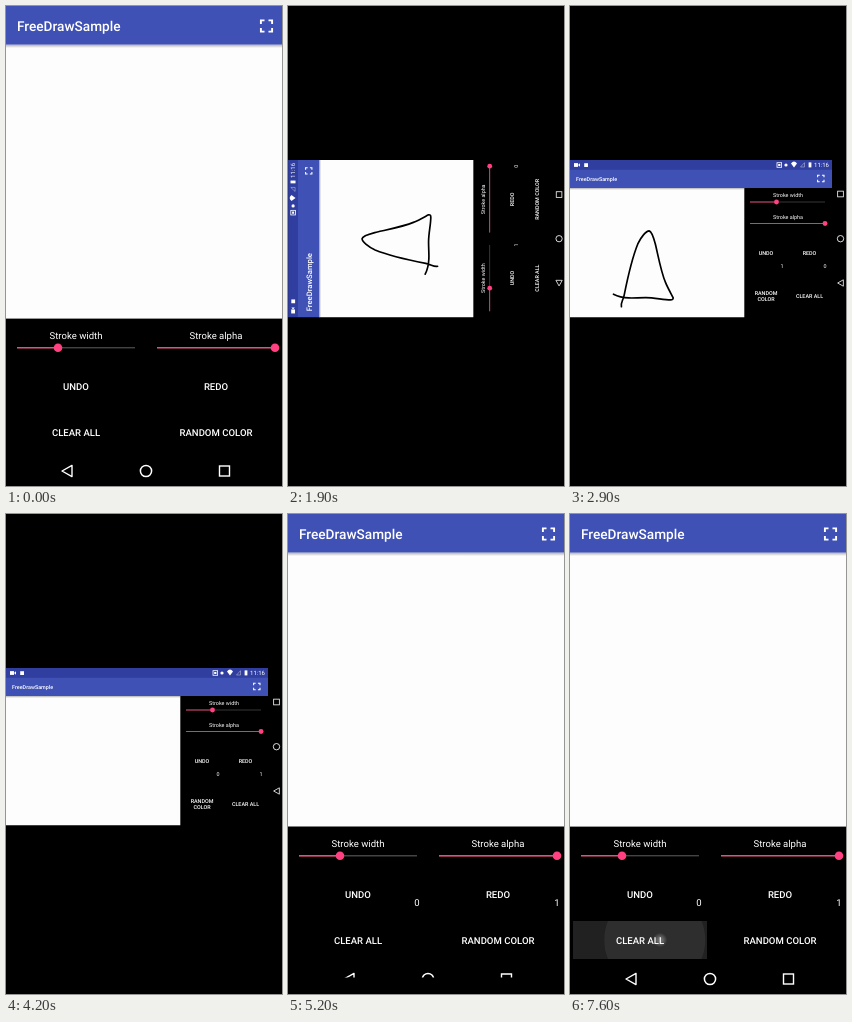
An HTML page that plays this animation: 276x480 px, repeating every 7.7 s.

```html
<!DOCTYPE html>
<html lang="en">
<head>
<meta charset="utf-8">
<title>Free drawing demo</title>
<style>
  html, body { margin: 0; width: 100%; height: 100%; overflow: hidden; background: #000; }
  svg { display: block; width: 276px; height: 480px; font-family: Roboto, sans-serif; }
  text { fill: #fff; text-rendering: geometricPrecision; }
  .mid { text-anchor: middle; }
  .bold { font-weight: 500; }
  .line { fill: none; stroke: #fff; }
</style>
</head>
<body>
<svg id="stage" viewBox="0 0 276 480"></svg>
<script>
const stage = document.getElementById('stage');
const LOOP = 7700, STEP = 100, ZOOM = 16 / 9;
const STROKE = 'M91 249C89 243 94 238 96 228C102 198 109 165 120 138C126 125 135 114.8 140 114.8' +
  'C146 116 149 131 152 142C157 164 162 190 169 206C173 216 180 228 182.5 233' +
  'C183 236 181 237 178 237C165 237 150 233 134 233C122 233 112 234 104 233.5C92 233 85 231 77 227';

// Markup helpers
const rect = (x, y, w, h, fill, more = '') =>
  `<rect x="${x}" y="${y}" width="${w}" height="${h}" fill="${fill}" ${more}/>`;
const label = (x, y, size, text, cls = 'mid') =>
  `<text x="${x}" y="${y}" font-size="${size}" class="${cls}">${text}</text>`;
const button = (x, y, size, text) => label(x, y, size, text, 'mid bold');
const place = (x, y, scale, body) => `<g transform="translate(${x} ${y}) scale(${scale})">${body}</g>`;

const slider = (x, thumb, end, y, scale) =>
  rect(x, y - .7 * scale, end - x, 1.4 * scale, '#444') +
  rect(x, y - .7 * scale, thumb - x, 1.4 * scale, '#ff4081') +
  `<circle cx="${thumb}" cy="${y}" r="${4.3 * scale}" fill="#ff4081"/>`;

const fullscreen = '<path class="line" stroke-width="1.9" ' +
  'd="M-5.6-2V-5.6H-2M2-5.6H5.6V-2M5.6 2V5.6H2M-2 5.6H-5.6V2"/>';
const back = '<path class="line" stroke-width="1.4" stroke-linejoin="round" d="M-5 0L5-5.6V5.6Z"/>';
const home = '<circle class="line" stroke-width="1.5" r="5.6"/>';
const recent = '<rect class="line" stroke-width="1.4" x="-5" y="-5" width="10" height="10"/>';

const statusBar = width => rect(0, 0, width, 9.2, '#303f9f') +
  rect(4, 3.1, 4, 3.8, '#fff') + '<path fill="#fff" d="M8 5L10 3.3V6.7Z"/>' +
  rect(14.2, 3.2, 3.8, 3.8, '#fff') +
  place(width, 0, 1,
    '<rect class="line" stroke-width=".8" x="-55" y="2.7" width="4.6" height="4.6"/>' +
    rect(-53.8, 4, 2.2, 2, '#fff') +
    '<circle fill="#fff" cx="-46" cy="5" r="1.6"/>' +
    '<path fill="#fff" d="M-41 3.4Q-38-.2-35 3.4L-38 7.4Z"/>' +
    '<path class="line" stroke-width=".6" opacity=".6" d="M-31.5 7L-27.5 2.7V7Z"/>' +
    rect(-23.4, 2.4, 2.8, 5, '#fff') + label(-3, 7.2, 6, '11:16', '" text-anchor="end'));

const ripple = (id, x, y, w, h) => `<svg id="${id}" x="${x}" y="${y}" width="${w}" height="${h}">` +
  rect(0, 0, w, h, '#fff', 'opacity=".13"') +
  `<circle class="wave" cx="${w * .61}" cy="${h / 2}" fill="#fff" opacity=".06"/>` +
  `<circle class="touch" cx="${w * .65}" cy="${h / 2}" r="${h * .19}" fill="url(#touch)"/></svg>`;

const sketch = '<path class="sketch" fill="none" stroke="#000" stroke-width="3" stroke-linecap="round" ' +
  `stroke-linejoin="round" pathLength="1" stroke-dasharray="1 2" d="${STROKE}"/>`;

const portrait =
  rect(0, -17, 280, 498, '#000') + place(0, -16.7, ZOOM, statusBar(157.5)) +
  rect(0, 38, 280, 274.6, '#fdfdfe') + rect(0, 38.6, 280, 3.4, 'url(#shade)') + rect(0, -.4, 280, 39, '#3f51b5') +
  label(10.9, 25, 13.65, 'FreeDrawSample', 'bold') + place(260.5, 20, 1, fullscreen) + sketch +
  '<circle id="finger" r="7" fill="#888" opacity=".15"/>' +
  label(70, 332.7, 9.55, 'Stroke width') + slider(11, 52, 129, 341.7, 1) +
  label(210, 332.7, 9.55, 'Stroke alpha') + slider(151, 269, 269, 341.7, 1) +
  ripple('redoRipple', 143, 361, 134, 38) + ripple('clearRipple', 3, 407, 134, 38) +
  button(70, 384, 9.55, 'UNDO') + button(210, 384, 9.55, 'REDO') +
  button(70, 429.7, 9.55, 'CLEAR ALL') + button(210, 429.7, 9.55, 'RANDOM COLOR') +
  label(129, 392.3, 9.55, '', 'mid undos') + label(269, 392.3, 9.55, '', 'mid redos') +
  place(61, 465, 1, back) + place(140, 465, 1, home) + place(218.5, 465, 1, recent);

const landscape =
  rect(0, 154, 280, 157.5, '#000') + place(0, 154, 1, statusBar(262)) +
  rect(0, 182, 174.3, 129.5, '#fdfdfe') + rect(0, 182, 174.3, 2, 'url(#shade)') +
  rect(0, 163.2, 262, 18.8, '#3f51b5') +
  label(6.1, 174.5, 5.4, 'FreeDrawSample', 'bold') + place(250.8, 172.5, .57, fullscreen) +
  place(0, 160, .565, sketch) +
  label(218, 191, 5.4, 'Stroke width') + slider(180, 206.5, 255, 196, .57) +
  label(218, 213, 5.4, 'Stroke alpha') + slider(180, 255, 255, 217.5, .57) +
  ripple('undoRipple', 176, 227, 40, 39) +
  button(196, 248.7, 5.4, 'UNDO') + button(239.5, 248.7, 5.4, 'REDO') +
  button(196, 289, 5.4, 'RANDOM') + button(196, 295.3, 5.4, 'COLOR') + button(239.5, 292.2, 5.4, 'CLEAR ALL') +
  label(212, 262.3, 5.4, '', 'mid undos') + label(255, 262.3, 5.4, '', 'mid redos') +
  place(270.5, 188, .57, recent) + place(270.5, 232.7, .57, home) + place(270.5, 277, .57, back);

stage.innerHTML = '<defs><linearGradient id="shade" x2="0" y2="1"><stop stop-color="#000" stop-opacity=".3"/>' +
  '<stop offset="1" stop-color="#000" stop-opacity="0"/></linearGradient>' +
  '<radialGradient id="touch"><stop offset=".3" stop-color="#fff" stop-opacity=".3"/>' +
  '<stop offset="1" stop-color="#fff" stop-opacity="0"/></radialGradient>' +
  `<clipPath id="window">${rect(0, 0, 280, 463.5, '#fff')}</clipPath></defs>` +
  `<g id="tall">${portrait}</g><g id="wide">${landscape}</g>`;

const $ = id => document.getElementById(id);
const all = (selector, fn) => stage.querySelectorAll(selector).forEach(fn);
const tall = { node: $('tall'), cx: 140, cy: 232 };
const wide = { node: $('wide'), cx: 140, cy: 232.7 };
const track = stage.querySelector('.sketch');
const trackLength = track.getTotalLength();

function pose(view, at, angle, sx, sy, alpha) {
  view.node.setAttribute('transform',
    `translate(${at.cx} ${at.cy}) rotate(${angle}) scale(${sx} ${sy}) translate(${-view.cx} ${-view.cy})`);
  view.node.setAttribute('opacity', alpha);
}

// The old screen turns and stretches into the new one while fading out above it.
function rotateScreen(from, to, t, start, angle, k) {
  const x = t < start ? 0 : Math.min(1, (t - start + 148) / 500);
  const p = 1 - (1 - x) ** 5;
  const turn = angle * (1 - p);
  pose(to, to, turn, 1, 1, x > 0 ? 1 : 0);
  pose(from, to, turn, k + (1 - k) * p, k + (k * k - k) * p, Math.min(1, (1 - p) * 1.12));
  if (stage.lastChild !== from.node) stage.append(from.node);
  return x > 0 && x < 1;
}

function press(id, age, life) {
  const node = $(id), on = age >= 0 && age < life;
  node.style.display = on ? '' : 'none';
  if (!on) return;
  const fade = age > 300 ? 1 - (age - 300) / (life - 300) : 1;
  node.setAttribute('opacity', Math.min(1, (age + 100) / 300) * fade);
  node.querySelector('.wave').setAttribute('r', 10 + age * .135);
  node.querySelector('.touch').style.display = age > 300 ? 'none' : '';
}

function render(t) {
  const isWide = t >= 1900 && t < 4400;
  let turningTall = false;
  stage.style.clipPath = isWide ? 'inset(154px 0 168.5px)' : 'none';
  if (t < 1900) {
    pose(tall, tall, 0, 1, 1, 1);
    pose(wide, wide, 0, 1, 1, 0);
  } else if (isWide) {
    rotateScreen(tall, wide, t, 2400, -90, 1 / ZOOM);
  } else {
    turningTall = rotateScreen(wide, tall, t, 4900, 90, ZOOM);
  }
  // System bars stay hidden while the upright screen turns in.
  tall.node.setAttribute('clip-path', turningTall ? 'url(#window)' : 'none');

  const drawn = Math.max(0, Math.min(1, (t - 50) / 700));
  const visible = drawn > 0 && t < 3400 || t >= 5800 && t < 7500;
  all('.sketch', path => {
    path.style.display = visible ? '' : 'none';
    path.setAttribute('stroke-dashoffset', 1 - drawn);
  });
  const tip = track.getPointAtLength(trackLength * drawn);
  $('finger').setAttribute('transform', `translate(${tip.x} ${tip.y})`);
  $('finger').style.display = drawn > 0 && drawn < 1 ? '' : 'none';

  const counted = t >= 800;
  all('.undos', node => node.textContent = counted ? +visible : '');
  all('.redos', node => node.textContent = counted ? +!visible : '');

  press('undoRipple', t - 3300, 700);
  press('redoRipple', t - 5700, 500);
  press('clearRipple', t - 7300, 700);
}

const begin = performance.now();
function tick() {
  const t = (performance.now() - begin) % LOOP;
  render(Math.floor(t / STEP) * STEP);
  requestAnimationFrame(tick);
}
tick();
</script>
</body>
</html>
```
